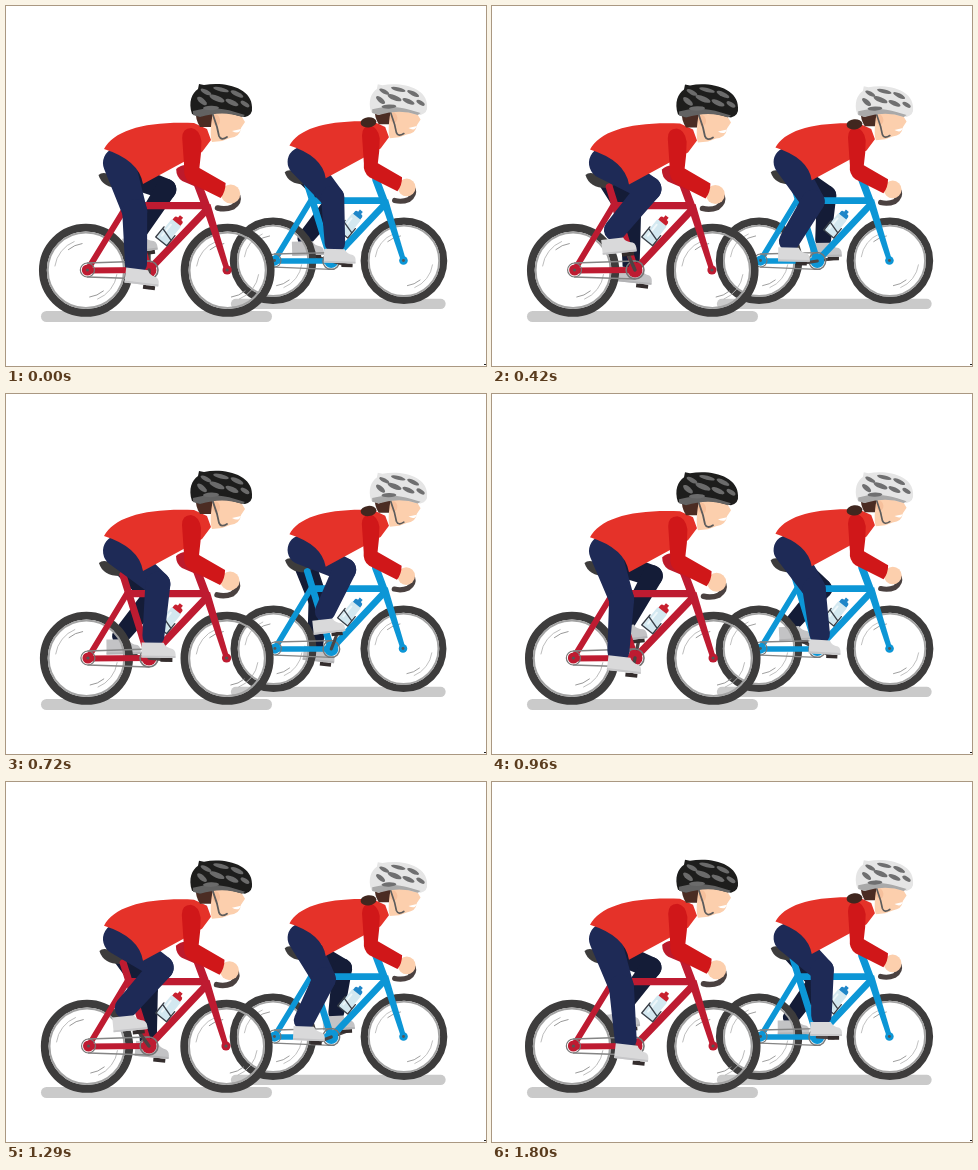
These frames come from a looping animation (480 by 360 pixels, 1.83 s). An HTML page with a canvas:

```html
<!DOCTYPE html>
<html lang="en">
<head>
<meta charset="utf-8">
<title>Two cyclists</title>
<style>
  html, body { margin: 0; width: 100%; height: 100%; overflow: hidden; background: #fff; }
  canvas { display: block; width: 480px; height: 360px; }
</style>
</head>
<body>
<canvas id="stage"></canvas>
<script>
// Two turns of 30 poses, with one pose held for two steps.
const LOOP = 1830, STEP = 30, POSES = 30, HOLD = 7;
const TAU = Math.PI * 2;
const canvas = document.getElementById('stage');
const ctx = canvas.getContext('2d');
const ratio = window.devicePixelRatio || 1;
canvas.width = 480 * ratio;
canvas.height = 360 * ratio;

const DARK = '#3d3c3c', NAVY = '#1e2a56', NAVY_FAR = '#141c37', SKIN = '#fccfad';
const CRANK = 17.5, AXLE = 264.3;

const blueRider = {
  x: 192.3, y: 9, scale: 0.93, start: 15, sway: 0.006,
  bb: [143, 264.5], hip: [112, 158], thigh: 50, shin: 56, lift: -1.5, headY: -1,
  paint: '#0c96d6', cap: '#1f86c8', helmet: '#e5e5e5', vent: '#6f6f70', band: '#a9a9a9', bun: true
};
const redRider = {
  x: 0, y: 0, scale: 1, start: 90, sway: 0.009,
  bb: [143, 264], hip: [113, 157], thigh: 51, shin: 59, lift: 0, headY: 0,
  paint: '#be1b31', cap: '#c8202f', helmet: '#1d1d1c', vent: '#6b6b6b', band: '#626262', bun: false
};

// x, y, half length, half height, tilt in degrees
const VENTS = [
  [200, 86, 6, 2.2, 28], [215, 83.5, 8, 2.1, 14], [231, 88, 7, 2.3, 26],
  [196, 95, 6, 2.6, 40], [211, 92.5, 8, 2.7, 22], [226, 96.5, 7, 2.5, 24],
  [239, 98, 5, 2.2, 32], [205, 102, 8, 2.3, -2]
];

function fill(path, color) {
  ctx.fillStyle = color;
  ctx.fill(new Path2D(path));
}

function stroke(path, color, width, cap = 'round') {
  ctx.strokeStyle = color;
  ctx.lineWidth = width;
  ctx.lineCap = cap;
  ctx.lineJoin = 'round';
  ctx.stroke(new Path2D(path));
}

function oval(x, y, rx, ry, color, tilt = 0) {
  ctx.beginPath();
  ctx.ellipse(x, y, rx, ry, tilt * Math.PI / 180, 0, TAU);
  ctx.fillStyle = color;
  ctx.fill();
}

function arc(x, y, r, color, width, from = 0, to = 360) {
  ctx.beginPath();
  ctx.arc(x, y, r, from * Math.PI / 180, to * Math.PI / 180);
  ctx.strokeStyle = color;
  ctx.lineWidth = width;
  ctx.stroke();
}

function within(draw) {
  ctx.save();
  draw();
  ctx.restore();
}

function limb([x1, y1], r1, [x2, y2], r2, color) {
  const a = Math.atan2(y2 - y1, x2 - x1);
  const lean = Math.acos((r1 - r2) / Math.hypot(x2 - x1, y2 - y1));
  ctx.beginPath();
  ctx.arc(x1, y1, r1, a + lean, a - lean + TAU);
  ctx.arc(x2, y2, r2, a - lean, a + lean);
  ctx.closePath();
  ctx.fillStyle = color;
  ctx.fill();
}

function kneeOf([hx, hy], [ax, ay], thigh, shin) {
  const d = Math.min(Math.hypot(ax - hx, ay - hy), thigh + shin);
  const along = (thigh * thigh - shin * shin + d * d) / (2 * d);
  const out = Math.sqrt(Math.max(0, thigh * thigh - along * along));
  const ux = (ax - hx) / d, uy = (ay - hy) / d;
  return [hx + ux * along + uy * out, hy + uy * along - ux * out];
}

function pedalAt(r, angle) {
  return {
    x: r.bb[0] + CRANK * Math.cos(angle),
    y: r.bb[1] + CRANK * Math.sin(angle),
    tilt: 0.12 * Math.sin(angle)
  };
}

function crank(r, pedal) {
  stroke(`M${r.bb} L${pedal.x} ${pedal.y}`, '#4a4444', 3.4);
  within(() => {
    ctx.translate(pedal.x, pedal.y);
    ctx.rotate(pedal.tilt);
    stroke('M-6 0 H6', '#342d2d', 4, 'butt');
  });
}

function shoe(pedal, color, sole) {
  within(() => {
    ctx.translate(pedal.x + 1, pedal.y);
    ctx.rotate(pedal.tilt);
    fill('M-26 -17 H-4 Q-2 -12 5 -11 Q9 -9 8 -2 H-26 Z', color);
    stroke('M-26 -3 H8', sole, 2, 'butt');
  });
}

function nearLeg(r, pedal) {
  const ankle = [pedal.x - 13, pedal.y - 17];
  const knee = kneeOf(r.hip, ankle, r.thigh, r.shin);
  limb(r.hip, 16, knee, 12.5, NAVY);
  limb(knee, 12.5, [ankle[0], ankle[1] - 7], 11, NAVY);
  shoe(pedal, '#d9d9da', '#c6c6c8');
}

function farLeg(r, pedal) {
  const hip = [r.hip[0], r.hip[1] + 9];
  const ankle = [pedal.x - 11, pedal.y - 17];
  const knee = kneeOf(hip, ankle, r.thigh - 1, r.shin - 5);
  limb(hip, 12, knee, 10.5, NAVY_FAR);
  limb(knee, 10.5, [ankle[0], ankle[1] - 3], 8.5, NAVY_FAR);
  shoe(pedal, '#c3c3c5', '#b3b3b5');
}

function wheel(x) {
  arc(x, AXLE, 42.6, DARK, 7.8);
  arc(x, AXLE, 37.8, '#a3a3a3', 2);
  for (const turn of [0, 180]) {
    arc(x, AXLE, 31, '#b5b5b5', 0.9, 188 + turn, 248 + turn);
    arc(x, AXLE, 27, '#8d8d8d', 0.9, 230 + turn, 262 + turn);
  }
}

function bottle(r) {
  within(() => {
    ctx.translate(164, 224.5);
    ctx.rotate(0.68);
    fill('M-6 -8 Q-6 -11 -3 -11 H3 Q6 -11 6 -8 V12 Q6 14 4 14 H-4 Q-6 14 -6 12 Z', '#d3e8f0');
    stroke('M-3 -5 V9', '#eef7fa', 2);
    fill('M-5 -10 V-13 Q-5 -15 -2 -15 V-18 H2 V-15 Q5 -15 5 -13 V-10 Z', r.cap);
    stroke('M-7 1 V14 H7 V1 M-7 3 L7 7', '#383f48', 1.4);
  });
}

function bike(r) {
  const [bx, by] = r.bb;
  wheel(80.5);
  wheel(221);
  fill('M93 169 Q97 165 106 169 L122 177 Q122 182 114 182 Q97 182 93 169 Z', DARK);
  stroke(`M82 264 L122 198 M82 264.5 L${bx} ${by}`, r.paint, 6);
  stroke(`M117 181 L${bx} ${by} L201 203 M122 199.7 H197`, r.paint, 7.2);
  stroke('M191 177 L200 201', r.paint, 8);
  fill('M196 200 L204 198 L223 263 L218 265 Z', r.paint);
  oval(82, 264, 5.5, 5.5, r.paint);
  oval(220.5, 264, 4.6, 4.6, r.paint);
  for (const x of [82, 220.5]) oval(x, 264, 1.6, 1.6, '#555');
  arc(82, 264, 7, '#777', 1.2);
  stroke(`M82 257 L${bx} ${by - 9} M82 271 L${bx} ${by + 9}`, '#858585', 1.4);
  arc(bx, by, 9, '#777', 1.6);
  oval(bx, by, 7.5, 7.5, r.paint);
  bottle(r);
}

function arms(r) {
  stroke('M211 202 Q219 204 226 201 Q233 196 231 190', '#4a4140', 5.5);
  if (!r.bun) fill('M170 163 Q177 157 184 160 L201 178 L197 184 L176 175 Q170 171 170 163 Z', '#bd1a2b');
  oval(224, 188, 9.5, 9.5, SKIN);
  fill('M176 132 Q176 122 185 122 Q193 123 195 135 Q195 148 193 162 L219 177 Q219 186 214 192 L184 177 Q177 172 178 162 Z', '#d01719');
}

function head(r) {
  fill('M190 105 H212 L206 121 L194 121 Q189 113 190 105 Z', '#4b2c23');
  fill('M207 106 H236 L236 111 L239 116 L235 122 Q234 131 224 132 L216 135 L206 136 Q203 128 207 106 Z', SKIN);
  if (r.bun) oval(183, 119, 8.5, 5.5, '#40271f', -6);
  oval(210, 114, 4, 5.5, '#f6c09c', -8);
  fill('M226 125 L235 123 Q233 129 226 125 Z', '#fff');
  stroke('M206 106 L211 121 L213 130 Q215 135 221 131', '#5d5c5c', 1.8);
  fill('M186 108 C182 96 186 87 192 83 L193 78 L198 79 C219 75 246 82 246 101 Q247 109 239 111 Q232 110 226 108 Q207 104 194 111 Z', r.helmet);
  fill('M187 105 Q207 99 229 106 L239 109 L236 111 Q217 104 194 111 L187 109 Z', r.band);
  for (const [x, y, rx, ry, tilt] of VENTS) oval(x, y, rx, ry, r.vent, tilt);
}

function rider(r, turn) {
  const angle = r.start * Math.PI / 180 + turn * TAU;
  const near = pedalAt(r, angle), far = pedalAt(r, angle + Math.PI);
  const stretch = 1 + r.sway * Math.sin(angle);
  const swayed = draw => within(() => {
    ctx.translate(150, 0);
    ctx.scale(stretch, 1);
    ctx.translate(-150, 0);
    draw(r);
  });
  within(() => {
    ctx.translate(r.x, r.y);
    ctx.scale(r.scale, r.scale);
    stroke('M40.5 310.5 H260.5', '#cacaca', 11);
    crank(r, far);
    farLeg(r, far);
    swayed(bike);
    crank(r, near);
    nearLeg(r, near);
    ctx.translate(0, r.lift - 1.1 * Math.cos(angle));
    fill('M98 143 C108 124 140 115 188 117 L201 123 L205 134 L196 146 L137 178 Q133 154 98 143 Z', '#e53229');
    swayed(arms);
    ctx.translate(0, r.headY);
    head(r);
  });
}

function paint() {
  const step = Math.floor(performance.now() % LOOP / STEP);
  const turn = (step < HOLD ? step : step - 1) / POSES;
  ctx.setTransform(ratio, 0, 0, ratio, 0, 0);
  ctx.fillStyle = '#fff';
  ctx.fillRect(0, 0, 480, 360);
  rider(blueRider, turn);
  rider(redRider, turn);
  ctx.fillStyle = '#222';
  ctx.fillRect(478, 358, 2, 1);
  requestAnimationFrame(paint);
}
paint();
</script>
</body>
</html>
```
